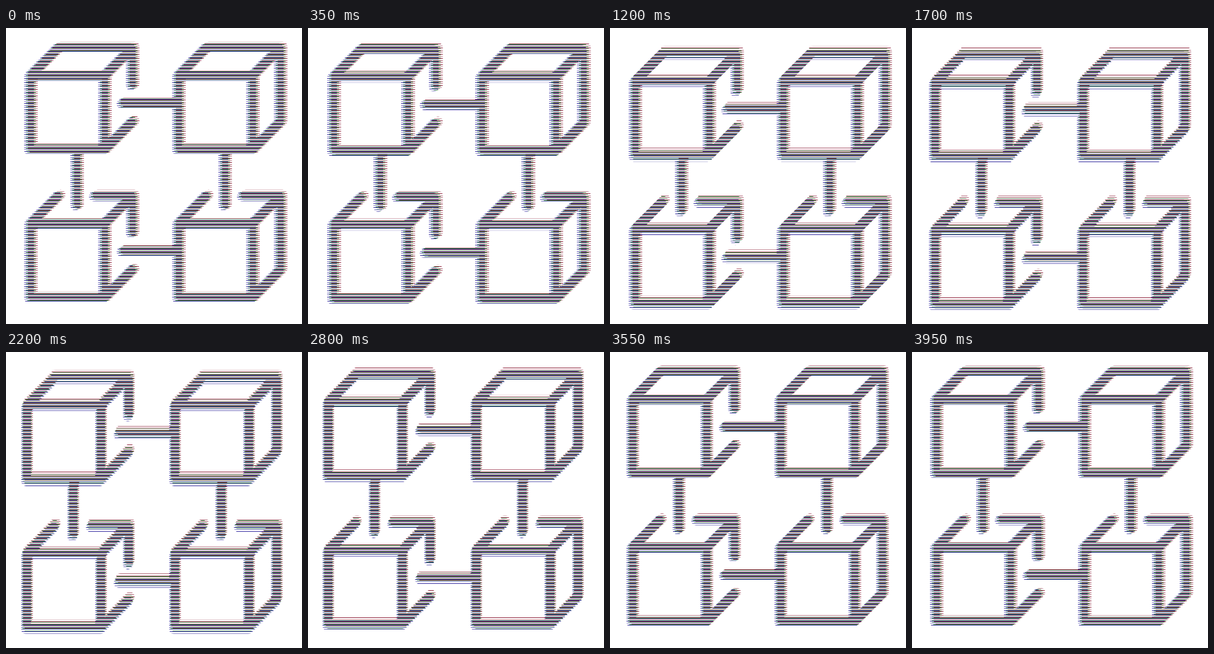
Write an HTML page with a canvas that moves like this. It is 512 px wide and 512 px high and loops after 4000 ms.

```html
<!DOCTYPE html>
<html lang="en">
<head>
<meta charset="utf-8">
<title>Striped cubes</title>
<style>
  html, body { margin: 0; width: 100%; height: 100%; overflow: hidden; background: #fff; }
  canvas { display: block; width: 512px; height: 512px; }
</style>
</head>
<body>
<canvas id="stage" width="512" height="512"></canvas>
<script>
const SIZE = 512, LOOP = 4000, STEP = 50;
const PITCH = 3.6, LINE = 0.8, STROKE = 17;

// Each layer drifts on its own ellipse: centre, radius and peak time per axis.
const layers = [
  { color: '#8c1c36', phase: 1.8, x: [43, 6.5, 650], y: [84.3, 4.7, 1670] },
  { color: '#1c7a2c', phase: 3.0, x: [40.4, 5.4, 670], y: [87.1, 5.9, 1715] },
  { color: '#2c229c', phase: 0.6, x: [37.8, 4.3, 690], y: [90, 7.2, 1750] }
];

function makeCanvas() {
  const c = document.createElement('canvas');
  c.width = c.height = SIZE;
  return c;
}

// Horizontal lines, sharpened by a steep coverage curve.
function makeStripes(phase) {
  const c = makeCanvas(), g = c.getContext('2d');
  for (let row = 0; row < SIZE; row++) {
    let cover = 0;
    const first = Math.floor((row - phase) / PITCH);
    for (let k = first; k <= first + 1; k++) {
      const top = phase + k * PITCH;
      cover += Math.max(0, Math.min(row + 1, top + LINE) - Math.max(row, top));
    }
    g.globalAlpha = Math.max(0, Math.min(1, (cover - 0.25) * 2));
    g.fillRect(0, row, SIZE, 1);
  }
  return c;
}

function addLine(path, ox, oy, ...pts) {
  path.moveTo(ox + pts[0], oy + pts[1]);
  for (let i = 2; i < pts.length; i += 2) path.lineTo(ox + pts[i], oy + pts[i + 1]);
}

function makeCubes() {
  const path = new Path2D();
  for (const row of [0, 1]) for (const col of [0, 1]) {
    const add = (...pts) => addLine(path, col * 256, row * 256, ...pts);
    path.rect(col * 256, row * 256, 128, 128);
    add(0, 0, 48, -48);
    add(128, 0, 176, -48);
    add(128, 128, 176, 80);
    add(row ? 112 : 48, -48, 176, -48, 176, col ? 80 : 16);
    if (!col) add(160, 48, 256, 48);
    if (!row) add(80, 128, 80, 224);
  }
  return path;
}

const cubes = makeCubes();
const ctx = document.getElementById('stage').getContext('2d');
const buffer = makeCanvas(), ink = buffer.getContext('2d');
layers.forEach(l => { l.stripes = makeStripes(l.phase); });

const sway = ([mid, radius, peak], t) =>
  mid + radius * Math.cos((t - peak) / LOOP * 2 * Math.PI);

function drawLayer(layer, t) {
  ink.globalCompositeOperation = 'source-over';
  ink.clearRect(0, 0, SIZE, SIZE);
  ink.save();
  ink.translate(sway(layer.x, t), sway(layer.y, t));
  ink.strokeStyle = layer.color;
  ink.lineWidth = STROKE;
  ink.lineCap = ink.lineJoin = 'round';
  ink.stroke(cubes);
  ink.restore();
  ink.globalCompositeOperation = 'destination-in';
  ink.drawImage(layer.stripes, 0, 0);
  ctx.drawImage(buffer, 0, 0);
}

function draw(t) {
  ctx.globalCompositeOperation = 'source-over';
  ctx.fillStyle = '#fff';
  ctx.fillRect(0, 0, SIZE, SIZE);
  ctx.globalCompositeOperation = 'multiply';
  layers.forEach(l => drawLayer(l, t));
}

const start = performance.now();
function tick() {
  const t = (performance.now() - start) % LOOP;
  draw(Math.floor(t / STEP) * STEP);
  requestAnimationFrame(tick);
}
tick();
</script>
</body>
</html>
```
